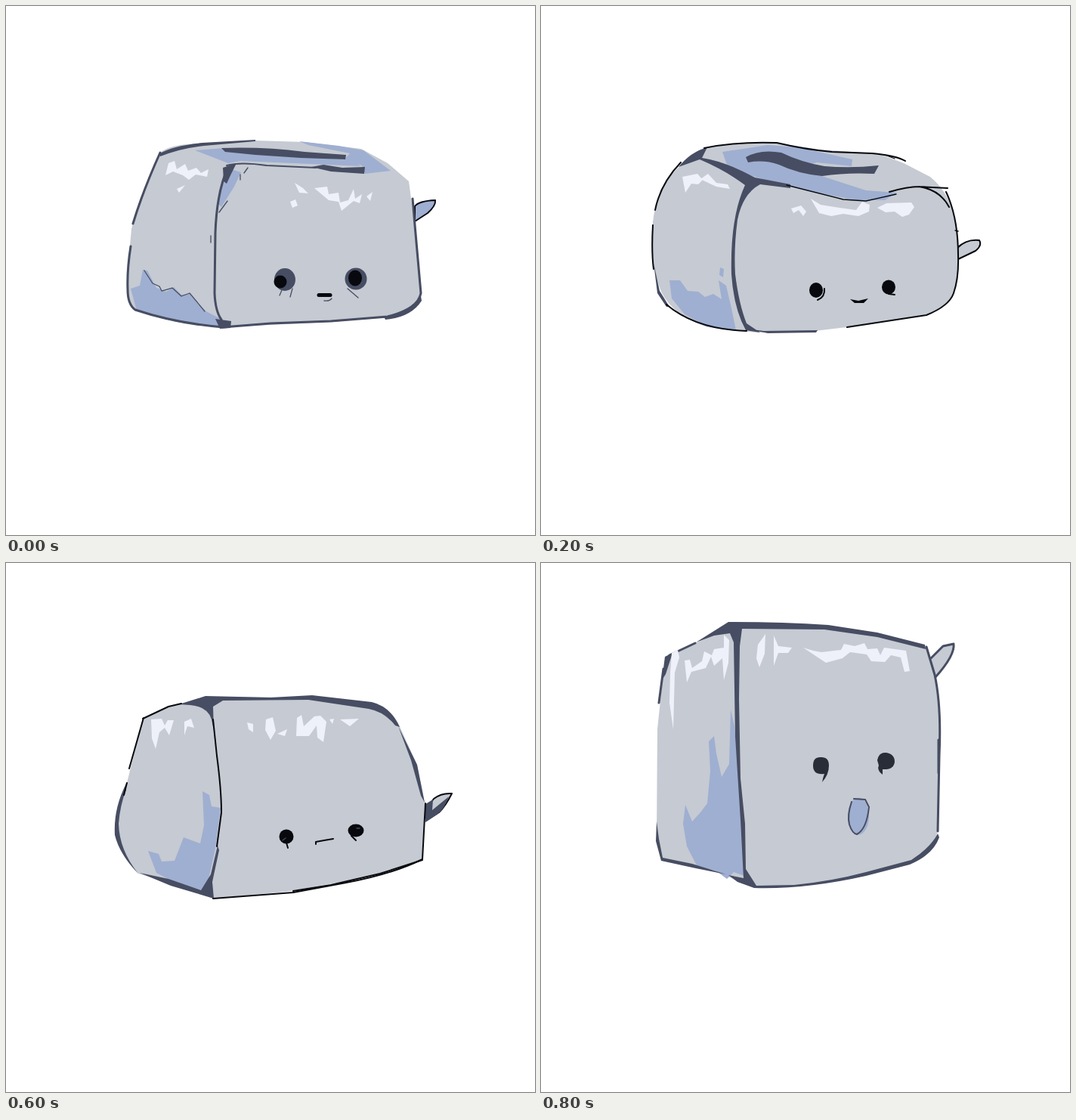
Recreate the animation shown at these times as an HTML page without scripts. Size 700 px wide and 700 px high, loop 1.3 s.

```html
<!DOCTYPE html>
<html lang="en">
<head>
<meta charset="utf-8">
<title>Toaster hop</title>
<style>
html, body { margin: 0; width: 100%; height: 100%; overflow: hidden; background: #fff; }
svg { display: block; width: 100vw; height: 100vh; }

/* one unit is 100 ms of the 1300 ms loop */
.pose { visibility: hidden; animation: short 1.3s step-end calc(var(--at) * 100ms) infinite; }
.hold { animation-name: hold; }
.rest { animation-name: rest; }
@keyframes short { 0% { visibility: visible } 7.6924%, 100% { visibility: hidden } }
@keyframes hold { 0% { visibility: visible } 15.3847%, 100% { visibility: hidden } }
@keyframes rest { 0% { visibility: visible } 38.4616%, 100% { visibility: hidden } }

.body { fill: #c6cad2; }
.shade { fill: #9fafd1; }
.shine { fill: #eff1fa; }
.dark { fill: #474d62; }
.ink { fill: #07090e; }
.navy { fill: #0b1533; }
.coal { fill: #292d38; }
.line, .pen { fill: none; stroke: #474d62; stroke-width: 3; stroke-linecap: round; stroke-linejoin: round; }
.pen { stroke: #07090e; stroke-width: 2; }
.thick { stroke-width: 5; }
.fine { stroke-width: 2; }
.thin { stroke-width: 1.3; }
.tail { stroke: #07090e; stroke-width: 2; stroke-linejoin: round; }
</style>
</head>
<body>
<svg viewBox="0 0 700 700">

<!-- standing -->
<g class="pose" style="--at:0">
  <path id="tail-up" class="shade tail" d="M541 265Q546 258 568 257Q569 264 558 274L541 285Z"/>
  <g id="standing">
    <path class="body" d="M204 194Q215 185 240 183L330 178L395 180L470 189L505 208L533 232L537 262L543 310L549 380Q545 401 505 412L430 418L288 425L225 418L172 403Q159 393 161 350L166 295Q180 245 204 194Z"/>
    <path class="shade" d="M388 179L440 185L473 191L509 218L475 222L471 211L447 204L455 195L400 184ZM250 191L288 188L400 200L455 204L470 212L380 208L310 205L294 208ZM292 214L311 220L302 239L285 266L281 262ZM165 374L177 370L181 349L187 350L199 373L212 378L222 372L232 382L243 381L261 402L284 414L291 425L225 418L173 403Z"/>
    <path class="dark" d="M285 188Q340 186 395 193L450 197L449 203L390 201L330 197L290 193ZM404 213L420 210L445 214L475 213L474 222L430 219ZM287 214L305 208L298 222L292 235L288 232ZM204 195Q220 185 260 181L330 177L330 179L262 185Q232 188 204 199ZM500 411Q535 404 549 384L550 390Q536 412 502 415ZM277 414L298 417L297 426L283 427Z"/>
    <path class="line" d="M204 194Q181 245 168 288M165 318Q160 350 161 375Q161 395 171 402Q225 420 287 425L350 420L430 417L505 411Q545 401 549 380L541 290L538 255M294 213Q279 245 277 300L276 380Q277 404 285 415"/>
    <path class="line fine" d="M292 211Q310 206 345 211L410 214"/>
    <path class="line thin" d="M183 350L194 367L203 371L206 377L220 373L232 384L243 380L263 404M310 223V230M320 214L315 221M271 304V313M365 376L362 383M379 374L376 385M452 374L466 386M421 390Q428 391 431 387M282 273L293 258"/>
    <path class="shine" d="M215 208L223 205L226 216L237 209L241 218L252 214L258 221L268 216L266 226L251 223L242 230L234 224L221 219L211 224ZM226 242L237 237L229 247ZM382 234L393 241L400 248L388 247ZM376 259L383 256L386 264L379 267ZM408 241L425 239L427 249L440 247L442 260L453 257L460 242L462 255L471 249L468 261L460 258L444 271L440 259L427 257ZM477 252L485 246L482 258Z"/>
    <ellipse class="dark" cx="369" cy="362" rx="14" ry="15"/>
    <circle class="dark" cx="463" cy="361" r="14.5"/>
    <circle class="ink" cx="363" cy="365" r="8.5"/>
    <ellipse class="ink" cx="462" cy="360" rx="9" ry="10.5"/>
    <path class="pen thick" d="M414 382.5H429"/>
  </g>
</g>

<!-- starting to sag -->
<g class="pose" style="--at:1">
  <use href="#tail-up" transform="translate(7 27)"/>
  <use href="#standing" transform="matrix(1.018 0 0 1.01 -9 0)"/>
</g>

<!-- sagging -->
<g class="pose" style="--at:2">
  <path id="tail-mid" class="body tail" d="M551 320Q563 308 580 310Q584 317 575 324L552 335Z"/>
  <g id="sagging">
    <path class="body" d="M215 190Q255 179 310 181L370 190L445 195L480 208L515 226Q538 245 546 275Q553 300 552 330Q553 365 545 384Q538 398 510 408L430 422L345 432L285 432L220 425Q175 410 159 378Q146 345 147 300Q149 240 185 211Z"/>
    <path class="shade" d="M240 193L300 184L340 187L412 203L411 212L365 207L340 215L390 231L430 244L471 247L455 257L418 257L370 248L310 234L260 219L246 210ZM170 363L184 363L194 377L208 378L217 385L228 381L239 388L235 363L245 370L252 400L258 429L219 424L190 408L173 387ZM237 346L242 348L241 359L236 356Z"/>
    <path class="dark" d="M271 200Q290 189 318 194Q345 207 375 212Q410 215 447 211L441 222Q405 220 372 225Q340 222 315 210Q295 203 274 207ZM182 213Q198 193 220 187L213 201Q245 206 283 227L330 236L330 241L290 236Q267 248 260 283Q255 320 257 355Q262 395 272 420L290 432L271 429Q255 400 252 355Q250 280 270 237Q245 218 210 203ZM149 340L157 377L170 398L166 398L154 380ZM272 427L295 430L366 429L364 432L300 433Z"/>
    <path class="pen" d="M216 188Q260 179 312 181Q350 190 385 193L438 195Q470 198 482 205M185 207Q158 235 151 270M148 290Q146 325 149 348M166 395Q205 428 272 430M405 425L510 409Q540 397 546 380M536 246Q552 280 552 330Q553 360 546 380M461 246Q485 239 500 239L538 241M500 239Q528 243 540 266"/>
    <path class="pen thin" d="M325 237L400 256L430 258L470 249M548 297L552 298M455 197L468 202"/>
    <path class="shine" d="M187 226L207 222L214 230L208 236L199 235L191 247ZM211 229L221 222L232 234L247 236L250 242L232 239L217 232ZM331 268L344 264L351 272L347 278L341 270L334 274ZM357 255L370 263L395 267L417 270L425 259L435 263L434 272L420 278L400 275L384 278L368 274ZM445 267L457 261L490 260L494 266L487 276L478 279L468 272L456 273Z"/>
    <ellipse class="ink" cx="364" cy="376" rx="9" ry="10"/>
    <ellipse class="ink" cx="460" cy="372" rx="9" ry="9.5"/>
    <path class="ink" d="M409 388L420 390L433 387L427 393H415Z"/>
    <path class="pen" d="M375 374Q376 385 366 389M460 381L468 382"/>
  </g>
</g>

<!-- spreading -->
<g class="pose" style="--at:3">
  <use href="#tail-mid" transform="translate(13 26)"/>
  <use href="#sagging" transform="matrix(1.047 0 0 1.012 -21 4)"/>
</g>

<!-- squashed -->
<g class="pose hold" style="--at:4">
  <path class="body" d="M553 362L572 359L582 362L574 375L554 383Z"/>
  <path class="line fine" d="M556 359L561 363M552 384L564 378"/>
  <path class="body" d="M174 209Q210 192 255 190Q300 200 350 211L410 208L465 209L490 217L515 243Q535 272 548 300Q558 320 557 345Q557 372 544 393L521 417L470 422L380 426Q345 428 325 433Q300 444 274 446L186 428L145 403Q120 366 119 325Q123 280 149 243Z"/>
  <path class="shade" d="M230 199L255 200L262 207L310 204L400 219L455 217L410 228L462 238L458 250L440 260Q400 268 360 262Q315 254 285 243L240 219L226 209ZM165 398L178 398L180 387L197 398L221 404L230 411L210 337L222 365L231 390L246 432L187 425Z"/>
  <path class="body" d="M375 248Q430 249 462 238L458 246L430 250Z"/>
  <path class="dark" d="M256 207L265 204L310 210Q350 226 385 232Q425 234 461 227L457 235Q425 242 392 243Q350 238 310 221L262 212ZM174 207L189 207L237 214Q255 219 295 246L292 249L244 229Q229 270 227 318Q225 366 242 402Q252 425 276 446L262 443Q235 402 224 350Q220 285 239 221L188 213L173 215Z"/>
  <path class="line" d="M176 208Q211 193 254 191Q300 200 350 211M172 213Q150 240 139 265Q119 297 119 333M511 244L529 271Q543 290 550 307M553 316Q559 335 557 362"/>
  <path class="line thick" d="M120 345Q123 383 151 407Q167 422 188 428L250 437L275 445M501 249L511 244L525 264M556 360Q551 381 534 401"/>
  <path class="pen" d="M462 209L490 217M380 426L430 422M458 422L517 418L527 409M172 210L160 232M189 209L210 214L238 215"/>
  <path class="line fine" d="M274 446Q305 443 325 433L380 426M295 246Q345 266 400 265L455 261L505 248"/>
  <path class="line thin" d="M213 345L226 375M215 195L229 191M400 265L430 261L460 264M269 425L276 430"/>
  <path class="shine" d="M178 244L183 226L193 232L189 242ZM197 238L207 246L219 233L218 258L207 251L199 245ZM306 268L319 270L324 288L336 278L340 288L353 282L355 294L339 292L324 303L313 296ZM359 290L370 287L379 284L381 296L373 301ZM386 289L401 280L411 287L410 298L398 292ZM414 291L421 290L427 278L437 278L440 293L431 286L424 297ZM455 287L460 289L457 295ZM469 288L474 283L478 293Z"/>
  <path class="navy" d="M356 379Q359 371 370 373L377 376L378 386Q378 393 371 398Q375 393 370 390Q358 393 356 379ZM448 372Q456 365 467 368Q471 376 465 382L455 382L461 393Q448 388 448 379ZM408 390L428 388L429 392L408 395Z"/>
</g>

<!-- springing back -->
<g class="pose" style="--at:6">
  <path class="body tail" d="M556 325L566 312Q576 304 590 305Q582 321 573 330L556 341Z"/>
  <path class="dark" d="M555 319L565 313L564 327L586 309Q580 326 570 333L555 343Z"/>
  <path class="body" d="M181 206L215 191L264 177L370 178L430 181L485 185Q508 192 519 212L544 267L554 317L551 392Q525 405 450 421L370 435L274 444L215 423L175 411Q145 382 145 350Q147 320 159 295Z"/>
  <path class="shade" d="M260 302L269 307L272 322L284 324L277 378L268 418L259 433L220 421L199 410L188 381L202 385L206 395L223 394L235 363L257 371L262 347Z"/>
  <path class="dark" d="M229 187L264 176L350 178L405 175L484 184Q509 190 521 217L515 215Q501 197 480 193L400 181L287 182L274 190L275 222L272 207Q267 190 244 188ZM519 216L544 267L554 317L549 308L536 261ZM159 292Q142 325 144 360Q150 385 175 411Q150 380 149 345Q151 320 159 300ZM177 410L215 418L258 433L271 412L280 374L282 380L273 422L275 444L218 427Z"/>
  <path class="pen" d="M181 206L215 190L232 186M182 205L163 272M160 291L156 307M274 207L279 255Q285 300 285 330L279 375M555 318L551 392Q510 412 450 423L380 436L274 444"/>
  <path class="pen line-end" d="M380 434L430 426L495 411L551 393"/>
  <path class="shine" d="M192 207L206 206L210 215L214 208H222L216 228L210 218L203 224L198 246L193 232ZM236 210L245 206L249 218L240 216L236 228ZM319 211L327 213L327 224L321 220ZM344 207L353 204L357 222L350 234L343 221ZM359 226L372 220L369 229ZM385 205L391 201L394 216L408 203L416 202L424 210L420 237L412 231L411 215L401 229L384 229ZM428 207L434 206L432 213ZM442 207L467 206L455 216Z"/>
  <circle class="ink" cx="371" cy="362" r="9.5"/>
  <ellipse class="ink" cx="463" cy="354" rx="10.5" ry="8.5"/>
  <path class="pen" d="M371 370L373 377M457 361L463 367M410 372V369L421 367L433 365"/>
  <path class="line thin" d="M366 367L370 364M464 351H468"/>
</g>

<!-- stretching -->
<g class="pose" style="--at:7">
  <path class="body tail" d="M520 202L528 197L539 196Q539 206 530 215Z"/>
  <path class="body" d="M188 176L242 157L290 143L365 138L430 145L470 154L500 177Q523 193 533 225Q546 265 545 315L538 379L520 410L470 418L400 427L330 428L240 429L180 417Q164 405 166 380L169 285Z"/>
  <path class="shade" d="M271 262L276 300L277 382L265 423L240 430L206 425L184 412L177 386L187 389L196 384L208 386L216 341L224 334L231 353L237 319L251 320L257 324L262 289Z"/>
  <path class="dark" d="M240 157L268 148L310 142L284 150L277 165L279 270L281 365L272 425L263 428L269 405L276 370L272 163L266 155ZM498 176L520 191Q544 232 545 310Q543 382 522 410L480 416L510 405L535 379L542 320Q545 245 522 203ZM169 291L173 295L169 365L167 390L180 410L192 421L173 409L164 389Z"/>
  <path class="line" d="M189 176L178 223L170 292M167 370Q164 406 188 419Q210 428 230 429L265 426"/>
  <path class="pen" d="M188 175L177 235L173 270M189 175L242 157M258 151L320 140Q390 134 460 153M278 267V298M264 423H298M330 424L420 423L490 414"/>
  <path class="shine" d="M193 185L207 179L219 180L222 187L245 177L258 166L262 175L257 180L254 174L236 187L213 191L199 208L194 199ZM302 160L340 151L378 153L383 162L412 166L425 160L430 168L452 168L455 175L471 177L478 184L484 206L479 205L476 190L464 183L450 179L450 171L423 174L427 188L417 173L391 172L372 160L351 165L348 174L340 169L332 184L319 178L305 187Z"/>
  <ellipse class="ink" cx="367" cy="327" rx="12" ry="11"/>
  <ellipse class="ink" cx="463" cy="322" rx="12" ry="12.5"/>
  <path class="coal" d="M361 324L375 322L372 332L364 333ZM455 319L471 318L467 330L457 331Z"/>
  <path class="pen" d="M376 338Q371 343 363 343M462 333L472 330"/>
  <circle class="shade" cx="422" cy="363" r="12.5"/>
  <path class="line fine" d="M416 353Q409 357 410 366Q413 374 423 375M427 353Q435 361 433 367L428 373"/>
</g>

<!-- tall, mouth open -->
<g class="pose rest" style="--at:8">
  <path class="body" d="M516 126L532 110L547 108Q545 126 521 152Z"/>
  <path class="line" d="M516 126L532 110L546 107Q548 122 522 151"/>
  <path class="body" d="M170 122L215 101L250 80L380 84L450 94L510 111L522 150Q530 195 527 260L524 358Q519 382 487 396L430 411Q350 430 280 428L235 410L160 391L153 365L154 220L161 153Z"/>
  <path class="shade" d="M251 194L256 216L259 255L264 295L268 345L269 414L255 409L246 418L231 407L207 402L193 375L188 345L191 320L200 342L211 330L220 318L224 275L222 236L229 229L232 252L239 283L249 266Z"/>
  <path class="dark" d="M205 105L248 78Q320 78 380 82L445 92L508 108L509 114L445 98L375 88L266 87L263 110L262 180L264 285L270 345L271 405L285 427L335 426Q385 421 430 409L490 393Q515 377 525 358L527 363Q519 386 488 399L430 414Q350 432 282 430L260 422L248 413L268 417L264 340L257 230L255 105L250 93L229 96ZM164 124L174 119L165 147L160 155ZM153 342L156 365L161 390L200 398L245 412L205 404L159 394L152 368Z"/>
  <path class="line" d="M170 122L204 106M162 140L156 185M510 111L521 148Q530 190 527 255L525 355M526 234V278"/>
  <path class="shine" d="M173 119L181 115L183 125L177 145L175 220L170 185L171 145ZM190 129L197 128L200 139L213 130L216 117L226 122L229 114L242 112V95L249 102L248 132L242 155L240 126L229 136L225 124L218 139L199 144L193 158ZM287 108L297 94L296 120L289 138L285 126ZM308 96L314 110L332 112L327 119L314 119L308 136ZM347 112L360 116L371 118L397 115L401 107L415 110L428 106L432 114L445 113L449 122L454 112L483 116L488 143L481 144L476 125L463 122L455 131L437 130L431 121L409 118L399 126L377 132L362 122Z"/>
  <path class="coal" d="M360 268Q360 256 371 257Q381 257 381 268Q381 280 372 290Q373 284 375 279Q360 281 360 268ZM445 261Q447 250 457 251Q468 253 468 263Q467 274 452 273L452 280Q444 274 447 268Z"/>
  <ellipse class="shade" cx="420" cy="335" rx="14" ry="24.5"/>
  <path class="line fine" d="M411 316Q405 334 408 346Q412 358 418 359Q431 352 434 323L429 313L414 312"/>
</g>
</svg>
</body>
</html>
```
